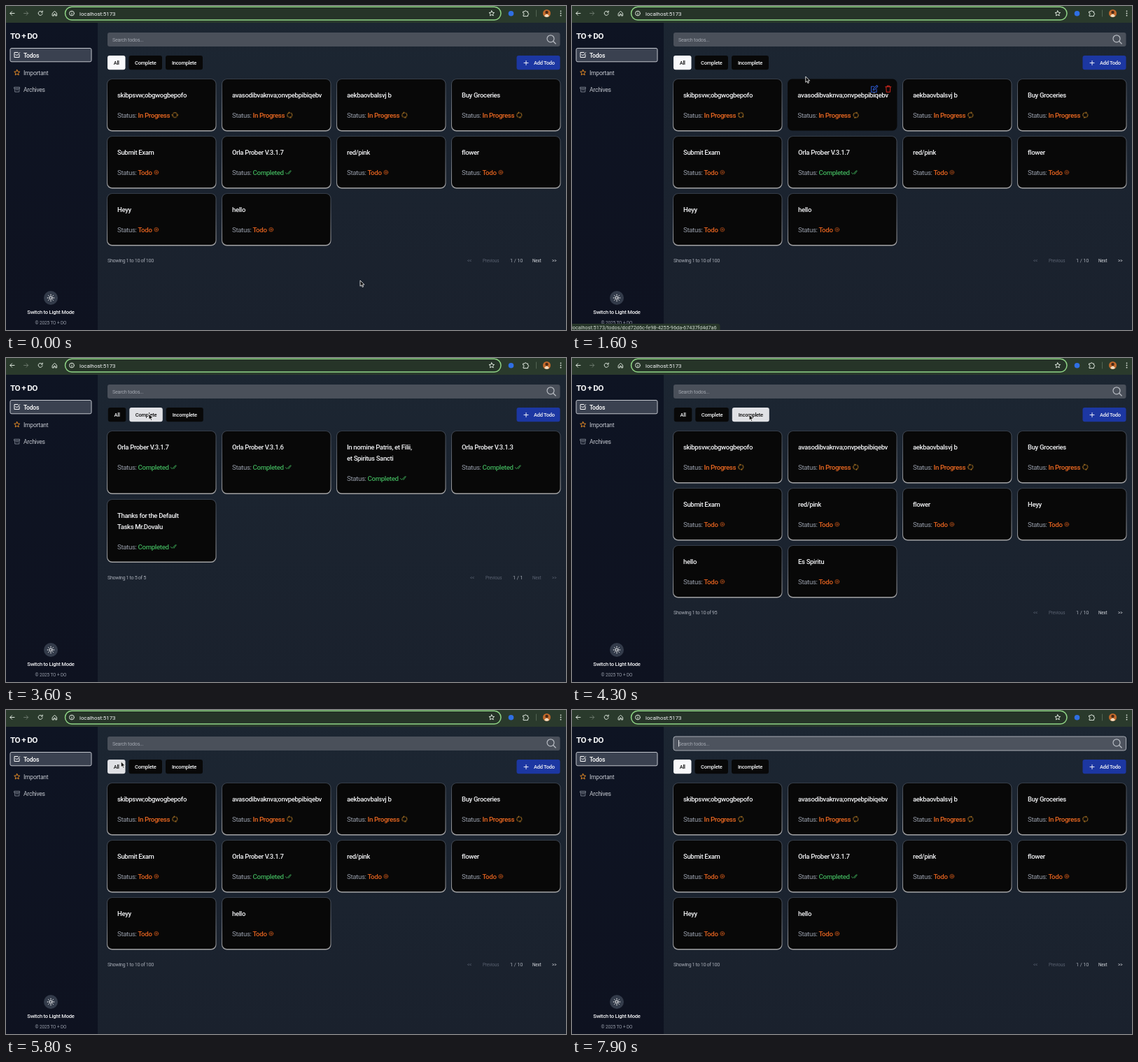
Animation, 800 px wide and 464 px high, one loop 8000 ms. Source, as an HTML page:

```html
<!DOCTYPE html>
<html lang="en">
<head>
<meta charset="utf-8">
<title>Todo board</title>
<style>
html, body { margin: 0; width: 100%; height: 100%; overflow: hidden; background: #1b232e; }
svg { display: block; width: 800px; height: 464px; }
text { font-family: Roboto, "Open Sans", sans-serif; white-space: pre; fill: #f3f4f6; }
.line { fill: none; stroke: currentColor; stroke-linecap: round; stroke-linejoin: round; }
.brand { font-size: 11.8px; font-weight: 700; letter-spacing: -.68px; }
.nav { font-size: 8.6px; letter-spacing: -.27px; fill: #c1c5cd; }
.nav.on { font-weight: 500; fill: #fff; }
.mode { font-size: 7.6px; font-weight: 500; letter-spacing: -.22px; text-anchor: middle; }
.legal { font-size: 6.4px; text-anchor: middle; letter-spacing: -.08px; fill: #969ca8; }
.hint { font-size: 7.2px; letter-spacing: -.25px; fill: #a0a5ae; }
.url { font-size: 7.9px; letter-spacing: -.03px; }
.link { font-size: 7.3px; fill: #d3ddd4; }
.title { font-size: 9.5px; font-weight: 500; letter-spacing: -.33px; }
.status { font-size: 9.7px; letter-spacing: -.36px; fill: #969ca8; }
.status tspan { font-weight: 500; }
.small { font-size: 7.3px; letter-spacing: -.4px; fill: #a6abb5; }
.page { font-size: 7.4px; letter-spacing: -.15px; fill: #a6abb5; }
.tiny { font-size: 6.3px; letter-spacing: -.12px; fill: #d5d8dd; }
.dim { fill: #596170; }
.button { font-size: 7.5px; font-weight: 500; letter-spacing: -.25px; }
.tab text { text-anchor: middle; }
.tab rect { fill: #080808; }
.tab.hover rect { fill: #191a1b; }
.tab.on rect { fill: #f8f9fb; }
.tab.on.hover rect { fill: #e0e1e5; }
.tab.on text { fill: #111; }
.card .tools { visibility: hidden; }
.view.on .card.hover .tools { visibility: visible; }
.card.hover { transform: scale(1.012); }
.card.hover .edge { opacity: 0; }
.view { visibility: hidden; }
.view.on { visibility: visible; }
.spin { animation: spin 1s linear infinite; }
.pulse { animation: pulse 2s ease-in-out infinite; }
.caret { animation: blink 1s step-end infinite; }
@keyframes spin { to { transform: rotate(360deg); } }
@keyframes pulse { 50% { opacity: .55; } }
@keyframes blink { 0% { opacity: 0; } 50% { opacity: 1; } }
</style>
</head>
<body>
<svg viewBox="0 0 800 464">
  <defs>
    <linearGradient id="edge" x2="0" y2="1">
      <stop offset="0" stop-color="#3d444f"/><stop offset=".5" stop-color="#686d76"/><stop offset="1" stop-color="#a3a3a4"/>
    </linearGradient>
    <linearGradient id="side" x2="0" y2="1"><stop stop-color="#0e1423"/><stop offset="1" stop-color="#0e1220"/></linearGradient>
    <linearGradient id="main" x2="0" y2="1"><stop stop-color="#1c2632"/><stop offset="1" stop-color="#1a212d"/></linearGradient>
    <g id="sync" class="line" stroke-width="40" transform="scale(.0195) translate(-256 -256)">
      <path d="M434.7 285.6v-29.8c0-98.7-80.2-178.8-179.2-178.8a179 179 0 0 0-140 67.4m-38.7 82v29.8C76.8 355 157 435 256 435a180 180 0 0 0 140-67M32 256l44-44 46 44M480 256l-44 44-46-44"/>
    </g>
    <g id="dot"><circle class="line" r="2.8" stroke-width=".8"/><circle r="1" fill="currentColor"/></g>
    <path id="ticks" class="line" stroke-width=".9" d="M-4 .5l2 2L3-2.5M0 2l.5.5L4-2"/>
  </defs>

  <rect width="800" height="464" fill="url(#main)"/>
  <rect y="24" width="131" height="440" fill="url(#side)"/>

  <!-- browser bar -->
  <rect width="800" height="24" fill="#2a3a2c"/>
  <rect x="84.5" y="1.2" width="622.5" height="18.8" rx="9.4" fill="#263428" stroke="#8fd486" stroke-width="1.5"/>
  <g class="line" color="#dce5dc" stroke-width="1">
    <path d="M12 10.5H6M8.500 7.800L5.800 10.500l2.700 2.700"/>
    <path stroke="#69766a" d="M25.500 10.500h6M29 7.800l2.700 2.700L29 13.200"/>
    <path d="M51.500 8.500a3 3 0 1 0 .6 2.500M52.200 7v2h-2"/>
    <path d="M66.500 10.200L69.500 7.500l3 2.700v3.800h-2v-2.500h-2V14h-2z"/>
    <circle cx="94" cy="10.5" r="3.4"/><path d="M94 10.300v2M94 8.700v.1"/>
    <path d="M693.800 6.800l1.100 2.400 2.700.3-2 1.800.6 2.600-2.400-1.400-2.300 1.400.5-2.600-2-1.800 2.700-.3z"/>
    <path d="M739 8h2a1.200 1.200 0 0 1 2.400 0h2.100v2.200a1.200 1.200 0 0 1 0 2.400v2H739v-2.100a1.200 1.200 0 0 0 0-2.400z"/>
    <path stroke="#526353" d="M757.500 6v9"/>
  </g>
  <text class="url" x="105" y="13.7">localhost:5173</text>
  <circle cx="721.5" cy="10.8" r="3.8" fill="#2f6fe4"/>
  <circle cx="772.5" cy="10.5" r="5.5" fill="#c46a2b"/>
  <path d="M769 14.500q3.500-6 7 0a5.500 5.500 0 0 1-7 0" fill="#f0dcc0"/>
  <circle cx="772.5" cy="9" r="2.2" fill="#4a2a18"/>
  <g fill="#dce5dc"><circle cx="792.5" cy="7.3" r=".9"/><circle cx="792.5" cy="10.5" r=".9"/><circle cx="792.5" cy="13.7" r=".9"/></g>

  <!-- sidebar -->
  <text class="brand" x="6" y="47">TO + DO</text>
  <rect x="6" y="60.5" width="116" height="19.3" rx="2" fill="#3a4150" stroke="#c3c7ce"/>
  <g class="line" stroke-width="1">
    <path color="#fff" d="M19 69.500v4h-7v-7h5M14 69.500l1.500 1.600 4-4.300"/>
    <path color="#e28a26" d="M15.700 91.300l1.200 2.600 2.800.3-2.100 1.900.6 2.800-2.500-1.500-2.500 1.500.6-2.800-2.100-1.900 2.800-.3z"/>
    <path color="#747b88" d="M12 116.300h7.500v2H12zM12.700 118.300v4.700h6.100v-4.700M14.800 120h2"/>
  </g>
  <text class="nav on" x="25" y="73.7">Todos</text>
  <text class="nav" x="25" y="98.5">Important</text>
  <text class="nav" x="25" y="123">Archives</text>
  <circle cx="64" cy="418" r="10" fill="#333b4a"/>
  <g class="line" color="#fff" stroke-width="1"><circle cx="64" cy="418" r="2"/><path id="rays"/></g>
  <text class="mode" x="64" y="441">Switch to Light Mode</text>
  <text class="legal" x="64" y="455.5">© 2025 TO + DO</text>

  <!-- search and buttons -->
  <rect id="search" x="145" y="38" width="646.5" height="20" rx="3"/>
  <text class="hint" x="152" y="50.8">Search todos...</text>
  <g id="focus"><path class="caret" d="M152.500 43v9.500" stroke="#fff" stroke-width=".8"/></g>
  <g class="line" color="#b9bdc4" stroke-width="1.2"><circle cx="778" cy="46.8" r="5"/><path d="M781.700 50.500l3.500 3.500"/></g>
  <g id="tabs"></g>
  <rect x="729.5" y="71" width="62" height="20.3" rx="3" fill="#1c37a2"/>
  <path class="line" color="#fff" stroke-width=".9" d="M740 81.500h6M743 78.500v6"/>
  <text class="button" x="754" y="84.3">Add Todo</text>

  <g id="views"></g>

  <g id="link">
    <path d="M0 455h208q3.500 0 3.500 3.500v5.500H0z" fill="#27362a"/>
    <text class="link" x="-1" y="462.5">localhost:5173/todos/dcd72d6c-fe98-4255-96da-67437fd4d7a6</text>
  </g>
  <path id="cursor" d="M0 0v8.300l1.900-1.700 1.300 3 1.400-.6-1.300-2.900h2.600z" fill="#0a0a0a" stroke="#fff" stroke-width=".8" stroke-linejoin="round"/>
</svg>
<script>
const $ = id => document.getElementById(id);
const LOOP = 8000;

const KINDS = {
  p: { label: 'In Progress', color: '#ee6a22', at: 96.3 },
  t: { label: 'Todo', color: '#e2621f', at: 69.7 },
  c: { label: 'Completed', color: '#3fae5a', at: 94.3 }
};
const SHARED = ['p:skibpsvw;obgwogbepofo', 'p:avasodibvaknva;onvpebpibiqebv', 'p:aekbaovbalsvj b', 'p:Buy Groceries', 't:Submit Exam'];
const REST = ['t:red/pink', 't:flower', 't:Heyy', 't:hello'];
const ALL = [...SHARED, 'c:Orla Prober V.3.1.7', ...REST];
const VIEWS = [
  { from: 0, tab: 0, todos: ALL, total: 100, phase: 72, lead: 0 },
  { from: 3100, tab: 1, total: 5, tall: true, todos: ['c:Orla Prober V.3.1.7', 'c:Orla Prober V.3.1.6',
    'c:In nomine Patris, et Filii,|et Spiritus Sancti', 'c:Orla Prober V.3.1.3', 'c:Thanks for the Default|Tasks Mr.Dovalu'] },
  { from: 4200, tab: 2, todos: [...SHARED, ...REST, 't:Es Spiritu'], total: 95, phase: 144, lead: 144 },
  { from: 5400, tab: 0, todos: ALL, total: 100, phase: 144, lead: 144 }
];
const TABS = [['All', 145, 25.5], ['Complete', 175.5, 47.5], ['Incomplete', 228, 53]];
const CARD_W = 154.5;

// time, x, y of the pointer
const PATH = [[0, 506, 393], [200, 500, 386], [900, 420, 262], [1300, 362, 150], [1600, 334, 101], [2000, 246, 88], [2400, 204, 80],
  [3700, 204, 80], [4050, 254, 81], [4600, 252, 81], [5100, 177, 78], [5300, 157, 80], [5700, 157, 80], [6300, 200, 43], [6600, 203, 39]];
const FOCUS = 6500, HIDE = 7200, LAG = 100;

function pointer(t) {
  const i = PATH.findIndex(p => p[0] > t);
  if (i < 0) return PATH[PATH.length - 1].slice(1);
  const [t0, x0, y0] = PATH[i - 1], [t1, x1, y1] = PATH[i];
  const k = (t - t0) / (t1 - t0);
  return [x0 + (x1 - x0) * k, y0 + (y1 - y0) * k];
}

function icon(kind, angle) {
  if (kind === 'c') return '<use href="#ticks"/>';
  if (kind === 't') return '<g class="pulse"><use href="#dot"/></g>';
  return `<g color="#eda02f" class="spin" style="animation-delay:${-angle / 360}s"><use href="#sync"/></g>`;
}

function card(todo, i, view) {
  const h = view.tall ? 88.5 : 73, x = 145 + i % 4 * 164, y = 105 + Math.floor(i / 4) * (view.tall ? 98 : 82);
  const kind = todo[0], { label, color, at } = KINDS[kind];
  const lines = todo.slice(2).split('|');
  const base = 55 + (lines.length - 1) * 15.7;
  const title = lines.map((s, n) => `<text class="title" x="14" y="${26 + n * 15.7}">${s}</text>`).join('');
  return `<g transform="translate(${x} ${y})"><g class="card" data-box="${[x, y, CARD_W, h]}" style="transform-origin:${CARD_W / 2}px ${h / 2}px">
    <rect class="edge" x="-1" y="-.8" width="${CARD_W + 2}" height="${h + 2.2}" rx="7.5" fill="url(#edge)"/>
    <rect width="${CARD_W}" height="${h}" rx="6.5" fill="#080808"/>${title}
    <text class="status" x="14" y="${base}">Status: <tspan style="fill:${color}">${label}</tspan></text>
    <g transform="translate(${at} ${base - 3.8})" color="${color}">${icon(kind, i ? view.phase : view.lead)}</g>
    <g class="tools line" stroke-width="1"><path color="#2c57c8" d="M122 10.500h-4v8h7.500v-4M120.500 15.800l.5-2 4.800-4.800 1.500 1.500-4.800 4.800z"/>
    <path color="#d3281e" d="M138 11h8M140.500 11v-1.500h3V11M139 11l.5 7.500h5l.5-7.500"/></g></g></g>`;
}

function pager({ todos, total, tall }) {
  const y = tall ? 316.5 : 367, dx = tall ? 4 : 0, end = tall ? 'dim' : '';
  const put = (cls, x, s) => `<text class="${cls}" x="${x}" y="${y}">${s}</text>`;
  return put('small', 145, `Showing 1 to ${todos.length} of ${total}`) + put('tiny dim', 659 + dx, '&lt;&lt;')
    + put('tiny dim', 681 + dx, 'Previous') + put('page', 720 + dx, tall ? '1 / 1' : '1 / 10')
    + put('tiny ' + end, 752, 'Next') + put('tiny ' + end, 780, '&gt;&gt;');
}

$('rays').setAttribute('d', Array.from({ length: 8 }, (_, i) => {
  const c = Math.cos(i * Math.PI / 4), s = Math.sin(i * Math.PI / 4);
  return `M${64 + 3.8 * c} ${418 + 3.8 * s}L${64 + 4.8 * c} ${418 + 4.8 * s}`;
}).join(''));
$('tabs').innerHTML = TABS.map(([name, x, w]) => `<g class="tab" data-box="${[x, 71, w, 20.3]}">
  <rect x="${x}" y="71" width="${w}" height="20.3" rx="3"/><text class="button" x="${x + w / 2}" y="84.3">${name}</text></g>`).join('');
$('views').innerHTML = VIEWS.map(v => `<g class="view">${v.todos.map((s, i) => card(s, i, v)).join('')}${pager(v)}</g>`).join('');

const tabs = [...document.querySelectorAll('.tab')];
const views = [...document.querySelectorAll('.view')].map(el => ({ el, cards: [...el.querySelectorAll('.card')] }));
const boxes = new Map([...document.querySelectorAll('[data-box]')].map(el => [el, el.dataset.box.split(',').map(Number)]));
const show = (el, on) => { el.style.visibility = on ? 'visible' : 'hidden'; };

function hover(el, [px, py]) {
  const [x, y, w, h] = boxes.get(el);
  const on = px >= x && px <= x + w && py >= y && py <= y + h;
  el.classList.toggle('hover', on);
  return on;
}

function draw() {
  const t = performance.now() % LOOP;
  const [x, y] = pointer(t), felt = pointer(Math.max(0, t - LAG));
  const now = VIEWS.filter(v => v.from <= t).length - 1, { tab } = VIEWS[now];
  $('cursor').setAttribute('transform', `translate(${x} ${y})`);
  show($('cursor'), t < HIDE);
  tabs.forEach((el, i) => {
    el.classList.toggle('on', i === tab);
    el.setAttribute('transform', `translate(${tab ? .8 : 0} 0)`);
    hover(el, felt);
  });
  let linked = false;
  views.forEach((v, i) => {
    v.el.classList.toggle('on', i === now);
    v.cards.forEach(c => { if (hover(c, felt) && i === now) linked = true; });
  });
  show($('link'), linked);
  const focused = t >= FOCUS;
  show($('focus'), focused);
  $('search').setAttribute('fill', focused ? '#4d535e' : '#4a505a');
  $('search').setAttribute('stroke', focused ? '#a9adb5' : 'none');
  requestAnimationFrame(draw);
}
draw();
</script>
</body>
</html>
```
